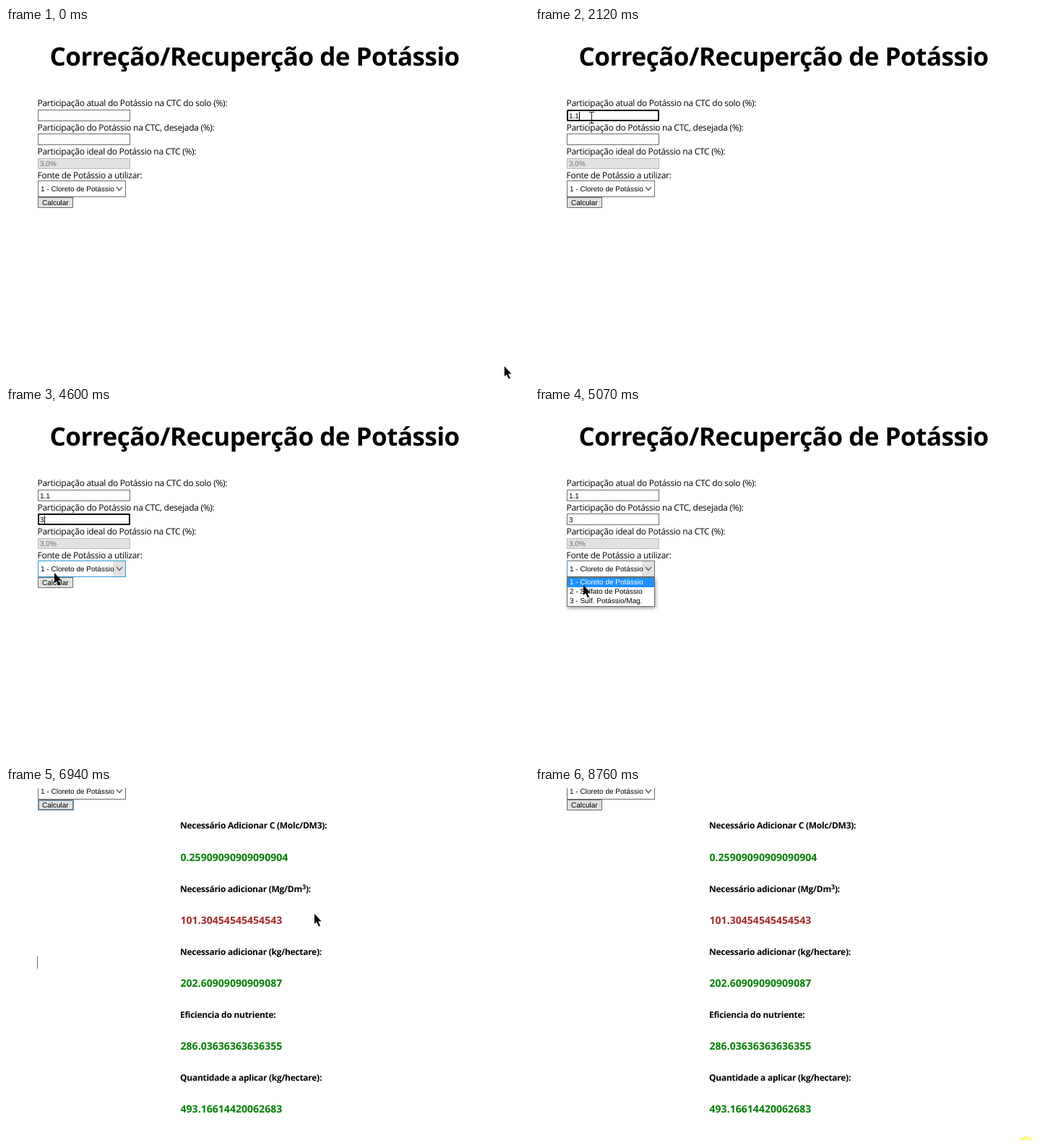
Write an HTML page with a canvas that moves like this. It is 724x487 px and loops after 8840 ms.

```html
<!DOCTYPE html>
<html lang="pt-BR">
<head>
<meta charset="utf-8">
<title>Correção de Potássio</title>
<style>
html, body { margin: 0; width: 100%; height: 100%; overflow: hidden; background: #fff; }
canvas { display: block; }
</style>
</head>
<body>
<canvas id="stage" width="724" height="487"></canvas>
<script>
const ctx = document.getElementById('stage').getContext('2d');
ctx.textRendering = 'geometricPrecision';

const LOOP = 8840, SCROLL_AT = 6000, SCROLL = 218;
const FOCUS_1 = 1010, TYPE_1 = 1930, FOCUS_2 = 2520, TYPE_2 = 3250, BLUR = 4870;
const OPEN = 4930, CLOSE = 5530, PRESS = 5930, END_CLICK = 8760;
const KEY_DELAY = 95, BLINK = 530, CLICK_TIME = 130, POINTER_STEP = 67;

const UI = '"Open Sans", "Noto Sans", sans-serif';
const CONTROL = '10px "Liberation Sans", Arial, sans-serif';
const BORDER = '#6b6b6b', HOVER = '#2b9bd7';

const options = ['1 - Cloreto de Potássio', '2 - Sulfato de Potássio', '3 - Sulf. Potássio/Mag.'];
const labels = [
  'Participação atual do Potássio na CTC do solo (%):',
  'Participação do Potássio na CTC, desejada (%):',
  'Participação ideal do Potássio na CTC (%):',
  'Fonte de Potássio a utilizar:'
];
const results = [
  ['Necessário Adicionar C (Molc/DM3):', '0.25909090909090904'],
  ['Necessário adicionar (Mg/Dm^3):', '101.30454545454543'],
  ['Necessario adicionar (kg/hectare):', '202.60909090909087'],
  ['Eficiencia do nutriente:', '286.03636363636355'],
  ['Quantidade a aplicar (kg/hectare):', '493.16614420062683']
];

const point = (x, y) => ({ x, y });
const home = point(690, 468);

// Each move starts where the previous one ended; `via` bends the path.
const moves = [
  { start: 70, end: 790, via: point(250, -30), to: point(78, 124) },
  { start: 4050, end: 4120, to: point(-40, 200) },
  { start: 4340, end: 4600, to: point(67, 228) },
  { start: 5000, end: 5070, to: point(67, 245) },
  { start: 6600, end: 7530, via: point(577, 269), to: point(416, -20) },
  { start: 7800, end: 8280, to: point(680, 494) }
];
const clicks = [990, 4800, 5470, 5870, END_CLICK];

const within = (t, a, b) => t >= a && t < b;
const easeOut = u => 1 - (1 - u) ** 1.6;

function pointerAt(t) {
  const i = moves.findLastIndex(m => m.start <= t);
  if (i < 0) return home;
  const from = i ? moves[i - 1].to : home;
  const { start, end, to, via = point((from.x + to.x) / 2, (from.y + to.y) / 2) } = moves[i];
  const steps = Math.round((end - start) / POINTER_STEP) + 1;
  const step = Math.floor((t - start) / (end - start) * (steps - 1) + 0.01) + 1;
  const u = easeOut(Math.min(1, step / steps));
  const bend = axis => Math.round(
    (1 - u) ** 2 * from[axis] + 2 * u * (1 - u) * via[axis] + u * u * to[axis]);
  return point(bend('x'), bend('y'));
}

function text(str, x, y, font, color = '#000', spacing = 0) {
  ctx.font = font;
  ctx.letterSpacing = spacing + 'px';
  ctx.fillStyle = color;
  ctx.fillText(str, x, y);
  return x + ctx.measureText(str).width;
}

function box(x, y, w, h, fill, border, line = 1) {
  ctx.fillStyle = fill;
  ctx.fillRect(x, y, w, h);
  ctx.strokeStyle = border;
  ctx.lineWidth = line;
  ctx.strokeRect(x + line / 2, y + line / 2, w - line, h - line);
}

function strokePath(d, color, width) {
  ctx.strokeStyle = color;
  ctx.lineWidth = width;
  ctx.stroke(new Path2D(d));
}

function input(y, value, { focused, hovered, caret }) {
  box(44, y, 128, 16, '#fff', hovered ? HOVER : BORDER);
  if (focused) {
    ctx.beginPath();
    ctx.roundRect(45, y + 1, 126, 14, 1.5);
    ctx.strokeStyle = '#000';
    ctx.lineWidth = 2;
    ctx.stroke();
  }
  const end = text(value, 47, y + 12, CONTROL);
  if (focused && caret) ctx.fillRect(Math.round(end), y + 3, 1, 11);
}

function select(hovered, open) {
  box(44, 211, 122, 23, '#fff', hovered && !open ? HOVER : BORDER);
  if (hovered || open) {
    ctx.fillStyle = '#e1e1e1';
    ctx.fillRect(148, 212, 17, 21);
  }
  if (open) strokePath('M44.5 212v21', HOVER, 1);
  text(options[0], 48, 226, CONTROL);
  strokePath('M153 220l4 4.5l4 -4.5', '#666', 1.5);
}

function dropdown() {
  ctx.save();
  ctx.shadowColor = 'rgba(0,0,0,.4)';
  ctx.shadowBlur = 5;
  ctx.shadowOffsetX = 1;
  ctx.shadowOffsetY = 2;
  ctx.fillStyle = '#fff';
  ctx.fillRect(44, 234, 122, 41);
  ctx.restore();
  box(44, 234, 122, 41, '#fff', BORDER);
  ctx.fillStyle = '#1e90ff';
  ctx.fillRect(45, 235, 120, 13);
  options.forEach((o, i) => text(o, 48, 244 + 13 * i, CONTROL, i ? '#000' : '#fff'));
}

function button(t) {
  if (within(t, PRESS, SCROLL_AT)) box(43, 233, 51, 17, '#2eaae2', '#1878ae', 2);
  else if (within(t, CLOSE, PRESS)) box(44, 234, 49, 15, '#bee6fd', '#3c7fb1');
  else if (within(t, SCROLL_AT, END_CLICK)) box(44, 234, 50, 15, '#e1e1e1', '#6f8799', 2);
  else box(44, 234, 49, 15, '#e1e1e1', BORDER);
  text('Calcular', 50, 245, CONTROL);
}

function form(t, pointer) {
  text('Correção/Recuperção de Potássio', 60.5, 52, '700 35px ' + UI, '#000', -0.5);
  labels.forEach((label, i) =>
    text(label, 43.5, Math.round(108.3 + 33.3 * i), '12px ' + UI, '#000', -0.28));

  const reset = [FOCUS_1, TYPE_1, FOCUS_2, TYPE_2].findLast(r => r <= t) ?? 0;
  const caret = (t - reset) % (2 * BLINK) < BLINK;
  const typed = (str, start) => str.slice(0, Math.max(0, Math.floor((t - start) / KEY_DELAY) + 1));
  const over = (y, w, h) => within(pointer.x, 44, 44 + w) && within(pointer.y, y, y + h);

  input(113, typed('1.1', TYPE_1),
    { focused: within(t, FOCUS_1, FOCUS_2), hovered: over(113, 128, 16), caret });
  input(146, typed('3', TYPE_2),
    { focused: within(t, FOCUS_2, BLUR), hovered: over(146, 128, 16), caret });
  box(44, 180, 128, 15, '#e1e1e1', '#b9b9b9');
  text('3,0%', 47, 191, CONTROL, '#6d6d6d');

  const open = within(t, OPEN, CLOSE);
  select(t < SCROLL_AT && over(211, 122, 23), open);
  button(t);
  if (open) dropdown();
}

// A caret in the label raises the character after it.
function resultLabel(label, y) {
  const [base, raised] = label.split('^');
  const font = '700 12px ' + UI;
  let x = text(base, 241, y, font, '#000', -0.27);
  if (raised) {
    x = text(raised[0], x, y - 4, '700 9px ' + UI);
    text(raised.slice(1), x, y, font, '#000', -0.27);
  }
}

function resultList() {
  results.forEach(([label, value], i) => {
    resultLabel(label, Math.round(56.4 + 87.2 * i));
    text(value, 241.5, 101 + 87 * i, '700 14.1px ' + UI, i === 1 ? '#a52a2a' : '#008000');
  });
}

function halo({ x, y }) {
  ctx.beginPath();
  ctx.arc(x, y, 12, 0, 2 * Math.PI);
  ctx.fillStyle = 'rgba(255,245,50,.6)';
  ctx.fill();
}

function arrow({ x, y }) {
  ctx.save();
  ctx.translate(x, y);
  ctx.fillStyle = '#000';
  ctx.fill(new Path2D('M0 0V14L3 11.3L6 17.5L8 16.6L5.2 10.6H9.6Z'));
  ctx.restore();
}

function textCursor({ x, y }) {
  ctx.fillStyle = '#222';
  ctx.fillRect(x, y - 8, 1, 16);
  for (const dy of [-8, 7]) {
    ctx.fillRect(x - 3, y + dy, 3, 1);
    ctx.fillRect(x + 1, y + dy, 3, 1);
  }
}

function draw(t) {
  const pointer = pointerAt(t);
  const scrolled = t >= SCROLL_AT;
  ctx.fillStyle = '#fff';
  ctx.fillRect(0, 0, 724, 487);

  ctx.save();
  if (scrolled) ctx.translate(0, -SCROLL);
  form(t, pointer);
  ctx.restore();

  if (scrolled) {
    resultList();
    if (t < END_CLICK) strokePath('M43.5 233v17', '#666', 1);
  }
  if (clicks.some(c => within(t, c, c + CLICK_TIME))) halo(pointer);
  if (within(t, moves[0].end, moves[1].start)) textCursor(pointer);
  else arrow(pointer);
}

function tick() {
  draw(performance.now() % LOOP);
  requestAnimationFrame(tick);
}
tick();
</script>
</body>
</html>
```
